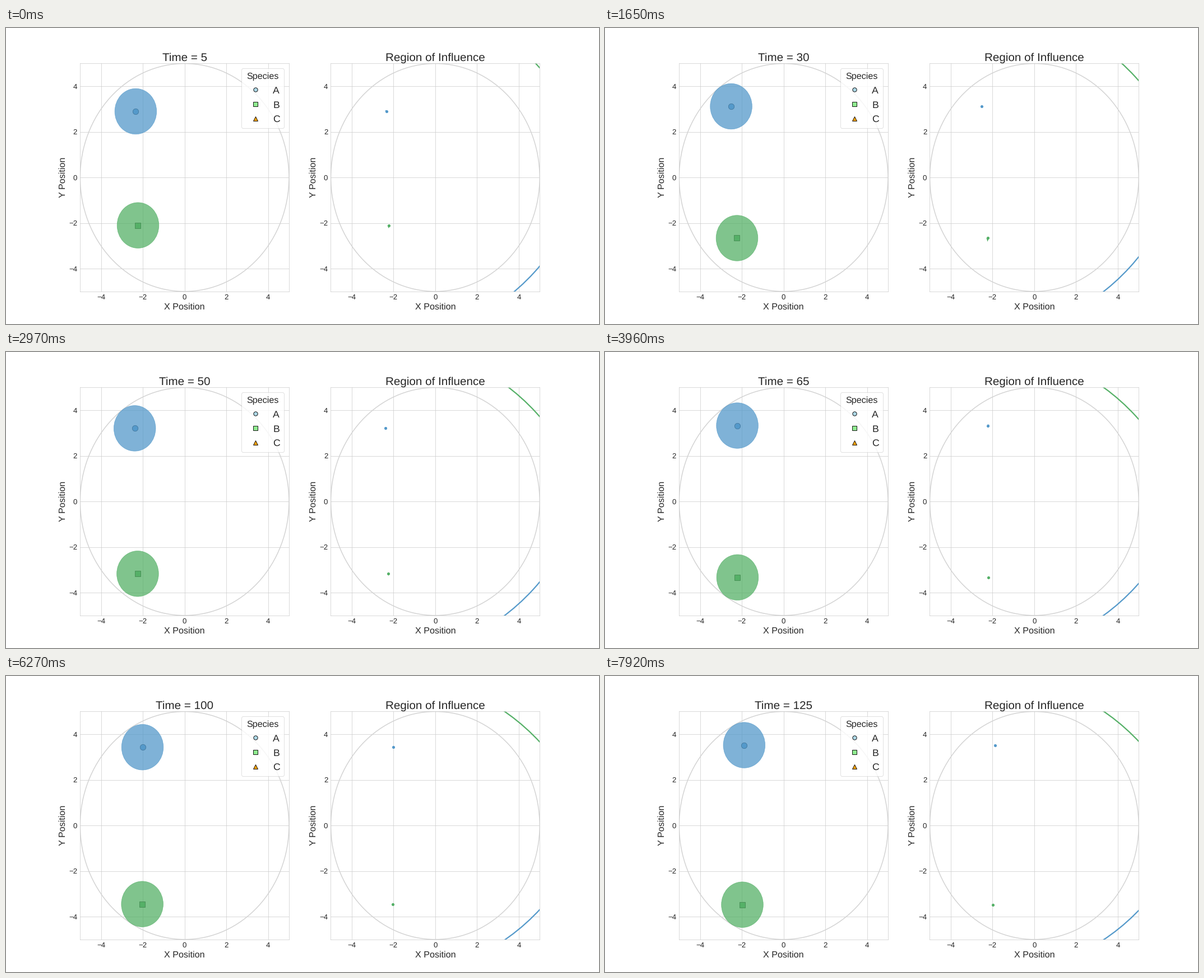
These frames come from a looping animation (1058x529 px, 8000 ms). A matplotlib script:

```python
import matplotlib.pyplot as plt
import numpy as np
from matplotlib.animation import FuncAnimation
from matplotlib.lines import Line2D
from matplotlib.patches import Circle, Polygon

LOOP, INTERVAL, HOLD = 8000, 40, 330  # ms
BLUE, GREEN = "#5499ca", "#55b067"
REACH = 10

plt.rcParams.update({
    "font.family": "Liberation Sans",
    "text.hinting": "none",
    "text.color": ".15",
    "axes.labelcolor": ".15",
    "axes.edgecolor": ".8",
    "axes.linewidth": 1,
    "axes.axisbelow": True,
    "grid.color": ".8",
    "grid.linewidth": 1,
})

# Key steps of the drift and the positions reached there.
STEPS = np.array([0, 5, 9, 12, 16, 19, 24])
PATH_A = np.array([(-2.34, 2.9), (-2.51, 3.12), (-2.385, 3.21), (-2.215, 3.33),
                   (-2.045, 3.435), (-2.015, 3.435), (-1.885, 3.525)])
PATH_B = np.array([(-2.23, -2.1), (-2.23, -2.66), (-2.245, -3.17),
                   (-2.205, -3.33), (-2.09, -3.4), (-2.025, -3.45),
                   (-1.975, -3.475)])


def locate(path, step):
    """Cubic Hermite curve through the key positions."""
    slope = np.gradient(path, STEPS, axis=0)
    k = np.clip(np.searchsorted(STEPS, step, "right") - 1, 0, len(STEPS) - 2)
    span = STEPS[k + 1] - STEPS[k]
    t = (step - STEPS[k]) / span
    ease = t * t * (3 - 2 * t)
    return (path[k] + ease * (path[k + 1] - path[k])
            + span * t * (t - 1) * ((t - 1) * slope[k] + t * slope[k + 1]))


def setup(ax, title):
    ax.set(xlim=(-5, 5), ylim=(-5, 5),
           xticks=range(-4, 5, 2), yticks=range(-4, 5, 2))
    ax.grid(True)
    ax.tick_params(length=0, pad=7, labelsize=18, labelcolor=".15")
    ax.set_xlabel("X Position", fontsize=22)
    ax.set_ylabel("Y Position", fontsize=22)
    ax.add_patch(Circle((0, 0), 5, fill=False, ec="lightgray", lw=2))
    return ax.set_title(title, fontsize=28)


class Agent:
    """A body on the left panel with its heading and reach on the right."""

    def __init__(self, path, color, marker):
        self.path = path
        self.mark, = left.plot([], [], marker, ms=14.1, mfc=color, mec="black",
                               mew=1, zorder=1)
        self.body = left.add_patch(Circle((0, 0), 1, color=color, alpha=.75,
                                          lw=1, zorder=2))
        self.dot, = right.plot([], [], "o", ms=7, color=color, mew=0, zorder=3)
        self.tail = right.add_patch(Polygon(np.zeros((3, 2)), color=color,
                                            lw=0, zorder=3))
        self.ring = right.add_patch(Circle((0, 0), REACH, fill=False, ec=color,
                                           lw=3, zorder=2))

    def move(self, step):
        pos = locate(self.path, step)
        heading = 1.2 * (locate(self.path, step + 1) - pos)
        side = np.array([-heading[1], heading[0]])
        side *= .06 / max(np.hypot(*side), 1e-9)
        for point in (self.mark, self.dot):
            point.set_data([pos[0]], [pos[1]])
        for circle in (self.body, self.ring):
            circle.center = pos
        self.tail.set_xy([pos + side, pos + heading, pos - side])


fig, (left, right) = plt.subplots(1, 2, figsize=(20, 10), dpi=52.9)
title = setup(left, "Time = 5")
setup(right, "Region of Influence")
agents = [Agent(PATH_A, BLUE, "o"), Agent(PATH_B, GREEN, "s")]

species = [("A", "o", "lightblue"), ("B", "s", "lightgreen"), ("C", "^", "orange")]
handles = [Line2D([], [], ls="none", marker=m, ms=10, mfc=c, mec="black",
                  mew=1.2, label=name) for name, m, c in species]
left.legend(handles=handles, title="Species", loc="upper right",
            fontsize=24, title_fontsize=22, labelspacing=.57)


def update(frame):
    # Each step begins on the tick that contains its start time.
    step = (frame * INTERVAL + INTERVAL - 1) // HOLD
    title.set_text(f"Time = {5 * (step + 1)}")
    for agent in agents:
        agent.move(step)
    return []


anim = FuncAnimation(fig, update, frames=LOOP // INTERVAL, interval=INTERVAL,
                     repeat=True, repeat_delay=0)
plt.show()
```
